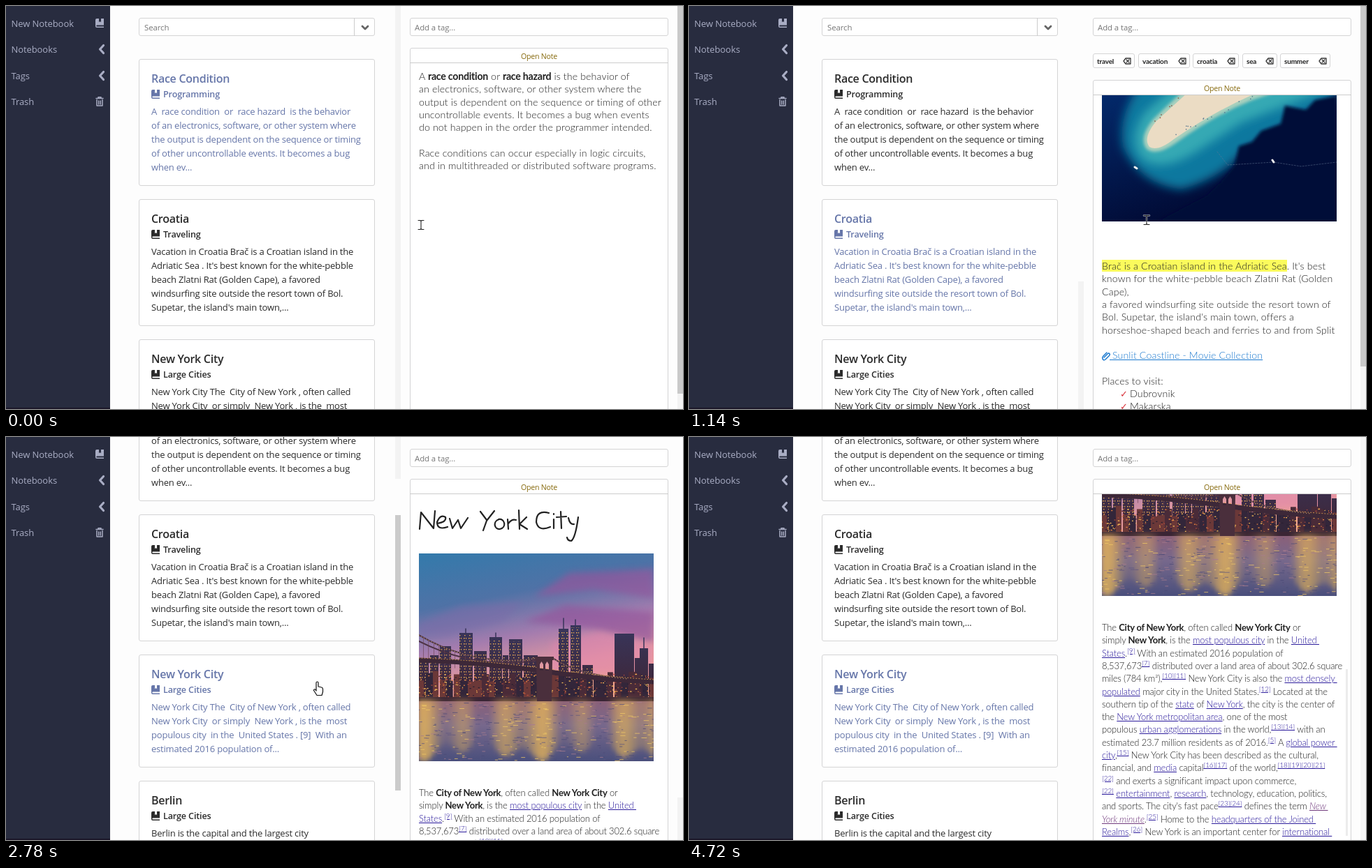
These frames come from a looping animation (969 by 578 pixels, 5.03 s). An HTML page:

```html
<!DOCTYPE html>
<html lang="en">
<head>
<meta charset="utf-8">
<title>Notebook app</title>
<style>
html, body { margin: 0; width: 100%; height: 100%; overflow: hidden; background: #fdfdfd; }
#stage { position: absolute; width: 969px; height: 578px; overflow: hidden; color: #333;
  font: 13px "Open Sans", "Noto Sans", sans-serif; letter-spacing: -.19px; }
#stage div, #stage p, #stage svg { position: absolute; box-sizing: border-box; }
#stage svg { overflow: visible; }
#stage svg.photo { overflow: hidden; width: 336px; left: 591px; }
#stage p { margin: -10px 0 0; line-height: 20px; white-space: pre; }
.layer { inset: 0; }
.side { width: 149px; height: 578px; background: #282c3f; color: #a9adc4; border-bottom: 2px solid #1b1729; letter-spacing: -.08px; }
.box { border: 1px solid #d4d4d5; border-radius: 3px; background: #fff; }
.card { left: 190px; width: 338px; color: #2b2b2b; }
.card.on { color: #6676a9; }
#stage .title { font-size: 16px; font-weight: 600; letter-spacing: -.27px; }
#stage .book { font-size: 12.6px; font-weight: 600; letter-spacing: -.15px; }
#stage .hint { font-size: 11.4px; letter-spacing: -.08px; color: #777; }
#stage .tag { font-size: 10px; font-weight: 700; letter-spacing: -.2px; }
#stage .open { width: 370px; text-align: center; font-size: 10.6px; letter-spacing: -.2px; color: #86690c; }
.note p { font: 300 14.2px Lato, sans-serif; letter-spacing: .12px; color: #222; }
#stage .small { font-size: 13px; letter-spacing: -.16px; }
#stage .big { font-size: 27.8px; font-weight: 700; letter-spacing: 0; }
.note b { font-weight: 700; letter-spacing: -.25px; }
.note u { color: #2c1c9c; }
.note i { color: #70397c; text-decoration: underline; }
.note sup { font-size: 10px; line-height: 0; vertical-align: 5px; }
.note mark { background: #fbfb5c; color: inherit; }
.note .link u { color: #1b79cf; }
.note s { color: #d8333b; font: 13px "DejaVu Sans", sans-serif; text-decoration: none; }
</style>
</head>
<body>
<div id="stage"></div>
<script>
const LOOP = 5030;
const stage = document.getElementById('stage');

let seed = 7;
const rnd = (a, b) => a + (b - a) * ((seed = seed * 16807 % 2147483647) / 2147483647);
const pick = list => list[Math.floor(rnd(0, list.length))];
const repeat = (n, make) => Array.from({ length: n }, (_, i) => make(i)).join('');

const text = (x, y, html, cls = '') => `<p class="${cls}" style="left:${x}px;top:${y}px">${html}</p>`;
const box = (x, y, w, h, inner = '') =>
  `<div class="box" style="left:${x}px;top:${y}px;width:${w}px;height:${h}px">${inner}</div>`;
const bar = (id, x, w, color) => `<div id="${id}" style="left:${x}px;width:${w}px;background:${color}"></div>`;
const icon = (x, y, d, style = 'fill="currentColor"') =>
  `<svg style="left:${x}px;top:${y}px" width="1" height="1"><path d="${d}" ${style}/></svg>`;
const rect = (x, y, w, h, fill, opacity = 1) =>
  `<rect x="${x.toFixed(1)}" y="${y.toFixed(1)}" width="${w.toFixed(1)}" height="${h.toFixed(1)}" fill="${fill}" opacity="${opacity.toFixed(2)}"/>`;
const line = (color, width) => `fill="none" stroke="${color}" stroke-width="${width}" stroke-linecap="round" stroke-linejoin="round"`;

const BOOK = 'M2 0h3v5.2l1.5-1.3L8 5.2V0h4v9.5H2.3a1 1 0 000 2H12V13H2a2 2 0 01-2-2V2a2 2 0 012-2z';
const LEFT = 'M7.5 1.5L2.5 7l5 5.5';
const TRASH = 'M1 2.5h10M4 2V.8h4V2M2 4.5V13h8V4.5M4.7 6v5M7.3 6v5';
const DELETE = 'M0 4L3 0h7v8H3zM4 2l4 4M8 2L4 6';

// *bold*, _link_, ~visited~ and [n] references
const rich = s => s
  .replace(/(\[\d+\])+/g, '<sup><u>$&</u></sup>')
  .replace(/\*(.+?)\*/g, '<b>$1</b>')
  .replace(/_(.+?)_/g, '<u>$1</u>')
  .replace(/~(.+?)~/g, '<i>$1</i>');
const paragraph = (y, cls, body) => body.trim().split('\n')
  .map((s, i) => s && text(591, y + i * 18.3, rich(s), cls)).join('');

const sidebar = `<div class="side">
  ${['New Notebook', 'Notebooks', 'Tags', 'Trash'].map((s, i) => text(7.5, 24.5 + i * 37.5, s)).join('')}
  ${icon(128, 18, BOOK)}${icon(132, 55, LEFT, line('currentColor', 3.2))}
  ${icon(132, 93, LEFT, line('currentColor', 3.2))}${icon(128, 130, TRASH, line('currentColor', 1.5))}</div>`;

const cards = [
  [76, 182, 'Race Condition', 'Programming', `A  race condition  or  race hazard  is the behavior
of an electronics, software, or other system where
the output is dependent on the sequence or timing
of other uncontrollable events. It becomes a bug
when ev...`],
  [277, 182, 'Croatia', 'Traveling', `Vacation in Croatia Brač is a Croatian island in the
Adriatic Sea . It's best known for the white-pebble
beach Zlatni Rat (Golden Cape), a favored
windsurfing site outside the resort town of Bol.
Supetar, the island's main town,...`],
  [478, 162, 'New York City', 'Large Cities', `New York City The  City of New York , often called
New York City  or simply  New York , is the  most
populous city  in the  United States . [9]  With an
estimated 2016 population of...`],
  [659, 182, 'Berlin', 'Large Cities', 'Berlin is the capital and the largest city'],
].map(([y, h, title, book, body]) => `<div class="box card" style="top:${y}px;height:${h}px">
  ${text(17, 27, title, 'title')}${icon(17, 43, BOOK)}${text(34, 50, book, 'book')}
  ${body.split('\n').map((s, i) => text(17, 74 + i * 20, s)).join('')}</div>`).join('');

const search = box(190, 17, 338, 26) + text(198, 30.5, 'Search', 'hint') +
  '<div style="left:498px;top:17px;width:1px;height:26px;background:#ccc"></div>' +
  icon(509, 28, 'M1 1l4 4 4-4', line('#666', 2.8));

const tags = [['travel', 578, 60], ['vacation', 643, 74], ['croatia', 721, 66], ['sea', 792, 50], ['summer', 846, 72]]
  .map(([s, x, w]) => box(x, 68, w, 21) + text(x + 6, 79, s, 'tag') +
    icon(x + w - 16, 75, DELETE, line('#333', 1.3))).join('');

const beach = `<svg class="photo" style="top:187px" height="352" viewBox="0 0 336 352">
  <defs><linearGradient id="sea" x2=".3" y2="1"><stop stop-color="#05346f"/><stop offset=".45" stop-color="#03296a"/>
  <stop offset="1" stop-color="#010a34"/></linearGradient>
  <filter id="soft"><feGaussianBlur stdDeviation="7"/></filter><filter id="edge"><feGaussianBlur stdDeviation="2"/></filter></defs>
  <rect width="336" height="352" fill="url(#sea)"/>
  <path d="M130 35Q115 80 80 110M175 25Q120 60 105 100" ${line('#0d5f92', 9)} filter="url(#soft)"/>
  <path d="M225 0L190 60L120 115L55 155Q22 200 30 245Q55 300 115 306Q170 290 200 255L336 175V0Z" fill="#08789f" filter="url(#soft)"/>
  <path d="M245 0L205 65L120 145L62 195Q35 235 58 262Q85 283 135 252L200 210L336 158V0Z" fill="#35a9b4" filter="url(#soft)"/>
  <path d="M336 172L305 178L292 192L262 186L256 212L228 222L215 238L196 244L190 272L170 296L150 315L80 352H336Z" fill="#010b38" filter="url(#edge)"/>
  <path d="M254 0Q228 60 192 98Q120 160 74 205Q52 232 64 248Q78 259 105 240Q160 200 215 178L336 137V0Z" fill="#a9d0bd" filter="url(#edge)"/>
  <path d="M260 0Q232 62 196 101Q126 164 78 208Q58 232 68 245Q80 252 103 234Q160 195 212 172L336 128V0Z" fill="#ebdcc4"/>
  <path d="M268 0L252 32L248 58L228 80L218 100L202 112L209 122L236 124L256 113L282 117L306 101L336 100V0Z" fill="#263f1f"/>
  ${repeat(110, () => { const x = rnd(225, 334), y = rnd(2, 110); return x + y * .55 > 275 ? rect(x, y, 5, 4, pick(['#385728', '#172c15'])) : ''; })}
  ${repeat(60, i => { const k = rnd(0, 1); return i % 2 ? rect(75 + 170 * k, 209 - 165 * k + rnd(-2, 3), 1.5, 1.5, '#8a5946') : rect(105 + 228 * k, 226 - 105 * k + rnd(-5, 2), 1.4, 1.4, '#55758e'); })}
  <path d="M127 19Q124 36 105 48Q90 62 78 84" ${line('#b8d2e2', 4)} stroke-dasharray="1.5 3"/>
  <path d="M127 19Q123 34 104 46Q89 60 77 84Q64 97 44 126" ${line('#e5f0f6', 1)}/>
  <path d="M165 252L180 271L246 267L285 273L336 267" ${line('#687895', .5)} stroke-dasharray="2 2"/>
  <path d="M47 274l3 2M244 264l2 3" ${line('#eee', 3)}/></svg>`;

const towers = [[0, 14, 152], [16, 12, 146], [30, 16, 133], [58, 19, 114], [79, 18, 140], [101, 18, 120], [120, 8, 146],
  [129, 19, 123], [150, 20, 146], [200, 14, 108], [217, 15, 103], [234, 15, 160], [252, 26, 176],
  [280, 28, 115], [309, 7, 150], [316, 12, 136], [329, 7, 158]];
// brightness of the city lights mirrored in the river, 0 to 1
const glow = x => Math.max(0, .45 + .35 * Math.sin(x / 9 + 1) + .3 * Math.sin(x / 26 - 4.6));
const city = `<svg class="photo" style="top:167px" height="298" viewBox="0 0 336 298">
  <defs><linearGradient id="sky" x2=".3" y2="1"><stop stop-color="#337aab"/><stop offset=".35" stop-color="#4f72a6"/>
  <stop offset=".62" stop-color="#a47cae"/><stop offset=".85" stop-color="#e59aa0"/><stop offset="1" stop-color="#f3a68f"/></linearGradient>
  <linearGradient id="wall" gradientUnits="userSpaceOnUse" x2="0" y1="110" y2="205"><stop stop-color="#38355a"/><stop offset="1" stop-color="#3f2535"/></linearGradient>
  <linearGradient id="river" x2="0" y2="1"><stop stop-color="#8a6079"/><stop offset=".4" stop-color="#77688c"/><stop offset="1" stop-color="#4a4f7c"/></linearGradient>
  <pattern id="lit" width="7" height="8" patternUnits="userSpaceOnUse"><path d="M1 1h1.6v1.4H1zM4 1h1.2v1.4H4zM2 5h1.5v1.3H2z" fill="#e2a653"/></pattern>
  <filter id="mist" x="-20%" width="140%"><feGaussianBlur stdDeviation="5"/></filter><filter id="shine"><feGaussianBlur stdDeviation="2 4"/></filter></defs>
  <rect width="336" height="214" fill="url(#sky)"/>
  <path d="M165 62L215 28L336 22V64L250 52ZM150 98L210 74L336 84V128L250 108Z" fill="#93569c" opacity=".7" filter="url(#mist)"/>
  <path d="M0 100L60 76L150 70L120 98L40 118H0Z" fill="#7a6ca8" opacity=".55" filter="url(#mist)"/>
  <path d="M190 128L260 112L336 132V175H190Z" fill="#df86ae" opacity=".6" filter="url(#mist)"/>
  ${towers.map(([x, w, y]) => rect(x, y, w, 211 - y, 'url(#wall)') + (x < 270 ? rect(x, y + 3, w, 206 - y, 'url(#lit)') : '')).join('')}
  <path d="M207 108V93M224 103V95M322 136V121M67 114V108M110 120V114" ${line('#38355a', 1.5)}/>
  ${repeat(34, i => rect(i * 10, rnd(168, 186), rnd(7, 12), 43, pick(['#4a2b38', '#33263a', '#6b3838'])))}
  ${repeat(420, () => rect(rnd(0, 334), rnd(172, 209), rnd(1, 2.6), 1.3, pick(['#f5bb58', '#e5813f', '#b04a3c', '#2a1f31'])))}
  <rect y="206" width="336" height="6" fill="#3a2535"/>
  <rect y="212" width="336" height="86" fill="url(#river)"/>
  <g filter="url(#shine)">${repeat(56, i => rect(i * 6, 210, 6, 60 + 26 * glow(i * 6), '#e3b35a', Math.min(.85, glow(i * 6) * .75)))}</g>
  ${repeat(420, () => { const x = rnd(-4, 334); return rect(x, rnd(213, 297), rnd(2, 8), 1, rnd(0, 1) < glow(x) * .7 ? '#efc766' : pick(['#4b4a76', '#a97c8e', '#5d5580']), .75); })}
  <path d="M0 117Q85 166 176 149M0 126Q85 169 176 152M190 149Q225 174 300 180" ${line('#4a3142', 2)}/>
  ${repeat(22, i => { const x = 6 + i * 7.5, k = x / 176; return rect(x, 117 + 98 * k - 66 * k * k, .6, 37 - 51 * k + 29 * k * k, '#6b4250'); })}
  <path d="M0 153Q90 156 180 169T336 184" ${line('#3d2838', 7)}/>
  <path d="M0 150Q90 153 180 165T336 181" ${line('#d89a4b', 1)} stroke-dasharray="1 3"/>
  <path d="M0 117Q85 166 176 149M190 149Q225 174 300 180" ${line('#e4b878', 1)} stroke-dasharray=".5 3.5"/>
  <path d="M166 148H193V153H191L190 212H169L168 153H166ZM173 168H178V159L175.500 155L173 159ZM181 168H186V159L183.500 155L181 159Z" fill="#4a2f3c" fill-rule="evenodd"/>
  </svg>`;

const heading = `<svg role="img" aria-label="New York City" width="1" height="1" style="left:0;top:0"><path ${line('#222', 2.2)} d="
  M592 132L594 108L612 131L614 106M617 124Q631 122 629 115Q622 110 617 122Q617 134 632 129M635 117L639 131L647 119L651 131L661 116
  M679 107L688 119M699 106L688 120L683 134M706 118C696 121 699 133 707 132C717 130 714 116 705 118M718 118L719 132M719 124Q724 117 730 119
  M734 105L735 132M745 115L735 125L746 132M777 109Q759 104 759 122Q762 136 779 129M784 118V131M784 110V111
  M794 107L795 131M788 115L802 114M805 116Q807 126 813 125M819 115Q815 145 809 149Q804 149 803 144"/></svg>`;

const bodies = [
  paragraph(101, '', `A *race condition* or *race hazard* is the behavior of
an electronics, software, or other system where the
output is dependent on the sequence or timing of other
uncontrollable events. It becomes a bug when events
do not happen in the order the programmer intended.

Race conditions can occur especially in logic circuits,
and in multithreaded or distributed software programs.`),
  text(591, 153, 'Vacation in Croatia', 'big') + beach +
  paragraph(603, '', `<mark>Brač is a Croatian island in the Adriatic Sea</mark>. It's best
known for the white-pebble beach Zlatni Rat (Golden
Cape),
a favored windsurfing site outside the resort town of
Bol. Supetar, the island's main town, offers a
horseshoe-shaped beach and ferries to and from Split`) +
  icon(591, 725, 'M3 9L8 4Q10 2 11 4Q12 5 10 7L5 12Q2 14 1 11Q0 9 2 7L7 2', line('#1b79cf', 1.5)) +
  text(602, 731, '<u> Sunlit Coastline - Movie Collection</u>', 'link') +
  text(591, 767.5, 'Places to visit:') +
  ['Dubrovnik', 'Makarska'].map((s, i) => text(617, 786 + i * 18.3, '<s>✓</s>') + text(631, 786 + i * 18.3, s)).join(''),
  heading + city + paragraph(510, 'small', `The *City of New York*, often called *New York City* or
simply *New York*, is the _most populous city_ in the _United _
_States_.[9] With an estimated 2016 population of
8,537,673[7] distributed over a land area of about 302.6 square
miles (784 km²),[10][11] New York City is also the _most densely _
_populated_ major city in the United States.[12] Located at the
southern tip of the _state_ of _New York_, the city is the center of
the _New York metropolitan area_, one of the most
populous _urban agglomerations_ in the world,[13][14] with an
estimated 23.7 million residents as of 2016.[5] A _global power _
_city_,[15] New York City has been described as the cultural,
financial, and _media_ capital[16][17] of the world,[18][19][20][21]
[22] and exerts a significant impact upon commerce,
[22] _entertainment_, _research_, technology, education, politics,
and sports. The city's fast pace[23][24] defines the term ~New ~
~York minute~.[25] Home to the _headquarters of the Joined _
_Realms_,[26] New York is an important center for _international _`),
];
const notes = bodies.map((body, i) => {
  const top = i === 1 ? 106 : 60;
  return `<div class="layer note">${i === 1 ? tags : ''}${box(578, top, 370, 600)}
    <div class="layer" style="clip-path:inset(${top + 22}px 0 0)"><div class="layer scroll">${body}</div></div>
    <div style="left:578px;top:${top + 21}px;width:370px;height:1px;background:#ccc"></div></div>
    <div class="layer label">${text(578, top + 12, 'Open Note', 'open')}</div>`;
}).join('');

stage.innerHTML = `${sidebar}<div class="layer" id="list">${search}${cards}</div>
  ${box(578, 17, 370, 26)}${text(585, 30.5, 'Add a tag...', 'hint')}${notes}
  ${bar('listTrack', 557, 8, '#f3f3f3')}${bar('listThumb', 557, 8, '')}
  ${bar('noteTrack', 961, 8, '#f3f3f3')}${bar('noteThumb', 961, 8, '')}${bar('innerThumb', 940, 3, '#ececec')}
  <svg id="beam" width="1" height="1" style="left:0;top:0">${['#fff" stroke-opacity=".6', '#222'].map((c, i) =>
    `<path d="M-4-6.5h3l1 1 1-1h3M-4 6.5h3l1-1 1 1h3M0-5.5v11" ${line(c, i ? 1.1 : 2.6)}/>`).join('')}</svg>
  <svg id="hand" width="1" height="1" style="left:0;top:0"><path fill="#fff" stroke="#111" stroke-width="1.2" stroke-linejoin="round"
    d="M-3 3V-8.5a1.5 1.5 0 013 0V-3l4.5 1A2.5 2.5 0 016.5 .5v4L5 9.5H-2L-6.5 2.5a1.4 1.4 0 012-1.5z"/></svg>`;

// The picture holds between steps: [time, value...]
const selection = [[0, 0], [360, 1], [2780, 2]];
const listScroll = [[0, 0], [1690, 40], [1810, 106], [1960, 151], [2080, 162], [2200, 166]];
const noteScroll = [[0, 0], [990, 110], [1140, 230], [2780, 0], [3350, 50], [3470, 139], [3620, 237]];
const listHover = [[0, false], [240, true], [510, false], [1540, true], [2930, false]];
const noteHover = [[0, true], [120, false], [750, true], [1540, false], [3050, true], [4600, false]];
const pointer = [[0, 594, 314], [120, 566, 320], [240, 490, 345], [360, 458, 352], [510, 485, 345], [630, 560, 330],
  [750, 622, 315], [870, 655, 307], [1390, 636, 309], [1540, 473, 342], [1690, 439, 360], [2350, 438, 360],
  [2630, 440, 361], [2780, 447, 361], [2930, 580, 343], [3050, 711, 321], [3200, 703, 313], [4180, 742, 325],
  [4300, 726, 342], [4450, 922, 556], [4600, 2000, 556]];
const at = (steps, t) => steps.filter(s => s[0] <= t).pop().slice(1);

const el = id => document.getElementById(id);
const all = selector => [...stage.querySelectorAll(selector)];
const cardEls = all('.card'), noteEls = all('.note'), labelEls = all('.label'), scrollEls = all('.scroll');
const place = (id, y, h, color) => {
  Object.assign(el(id).style, { top: y + 'px', height: h + 'px' });
  if (color) el(id).style.background = color;
};

function draw() {
  const t = performance.now() % LOOP;
  const [active] = at(selection, t), [listY] = at(listScroll, t), [noteY] = at(noteScroll, t);
  const [x, y] = at(pointer, t), [overList] = at(listHover, t), [overNote] = at(noteHover, t);

  cardEls.forEach((card, i) => card.classList.toggle('on', i === active));
  noteEls.forEach((note, i) => {
    note.style.display = labelEls[i].style.display = i === active ? '' : 'none';
    scrollEls[i].style.transform = `translateY(${-noteY}px)`;
  });
  el('list').style.transform = `translateY(${-listY}px)`;

  place('listTrack', 0, t < 2780 ? 578 : t < 2930 ? 60 : 0);
  place('listThumb', Math.round(listY * .676), t < 120 ? 0 : 395, overList ? '#cbcbcb' : '#fdfdfd');
  place('noteTrack', 0, 578);
  place('noteThumb', 0, t >= 4600 ? 0 : t >= 360 && t < 3050 ? 517 : 556, overNote ? '#c9c9c9' : '#fdfdfd');
  place('innerThumb', 333, t >= 4600 ? 239 : 0);

  const onCard = x < 528;
  el('hand').style.display = onCard ? '' : 'none';
  el('beam').style.display = onCard ? 'none' : '';
  el(onCard ? 'hand' : 'beam').style.transform = `translate(${x}px,${y}px)`;
  requestAnimationFrame(draw);
}
draw();
</script>
</body>
</html>
```
